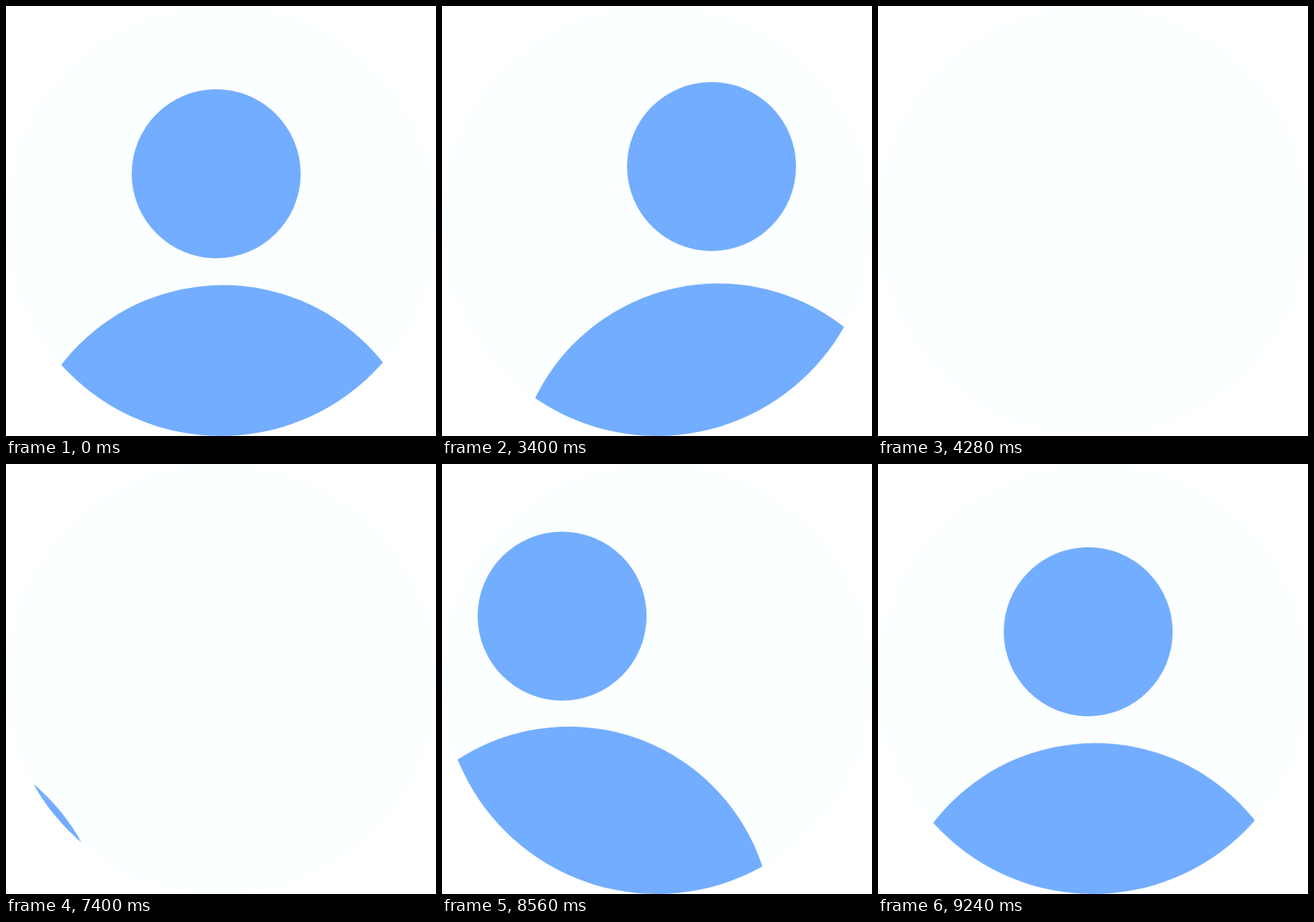
An HTML page that plays this animation: 537x537 px, repeating every 9880 ms.

```html
<!DOCTYPE html>
<html lang="en">
<head>
<meta charset="utf-8">
<title>Avatar</title>
<style>
  html, body { margin: 0; width: 100%; height: 100%; overflow: hidden; background: #fff; }
  svg { display: block; width: 100%; height: 100%; }
</style>
</head>
<body>
<svg viewBox="0 0 537 537">
  <clipPath id="disc"><circle cx="268.5" cy="268.5" r="268.5"/></clipPath>
  <clipPath id="headDisc"><circle cx="268.5" cy="274" r="268.5"/></clipPath>
  <circle cx="268.5" cy="268.5" r="268.5" fill="#fbffff"/>
  <g id="person" fill="#73adff">
    <g clip-path="url(#headDisc)"><circle id="head" r="105.5"/></g>
    <g clip-path="url(#disc)"><circle id="body" r="254.5"/></g>
  </g>
</svg>
<script>
const LOOP = 9880, STEP = 40;
const LEAVE = 2988, GONE = 4280, ENTER = 7400, HOME = 9240;
const [person, head, body] = ['person', 'head', 'body'].map(id => document.getElementById(id));

const bounce = (height, t, period) => height * Math.abs(Math.sin(Math.PI * t / period));

// Steady walk that brakes over the last stretch; left is the time to arrival
function remaining(left) {
  const speed = 0.2478, brake = 452;
  return speed * (left < brake ? left * left / (2 * brake) : left - brake / 2);
}

function pose(t) {
  if (t < LEAVE || t >= HOME) return { x: 0, headLift: 0, bodyLift: 0 };
  const leaving = t < GONE;
  const dt = leaving ? t - LEAVE : HOME - t;
  return {
    x: leaving ? 177.5 * (dt / 732) ** 1.52 : -remaining(dt),
    headLift: bounce(23, dt, leaving ? 365 : 514),
    bodyLift: bounce(21, dt, leaving ? 400 : 475)
  };
}

function place(circle, x, y) {
  circle.setAttribute('cx', x);
  circle.setAttribute('cy', y);
}

function draw(time) {
  const t = Math.floor((time % LOOP) / STEP) * STEP;
  const { x, headLift, bodyLift } = pose(t);
  person.setAttribute('visibility', t >= GONE && t < ENTER ? 'hidden' : 'visible');
  place(head, 262.5 + x, 209.5 - headLift);
  place(body, 271 + x, 603 - bodyLift);
}

const start = performance.now();
function tick() {
  draw(performance.now() - start);
  requestAnimationFrame(tick);
}
tick();
</script>
</body>
</html>
```
